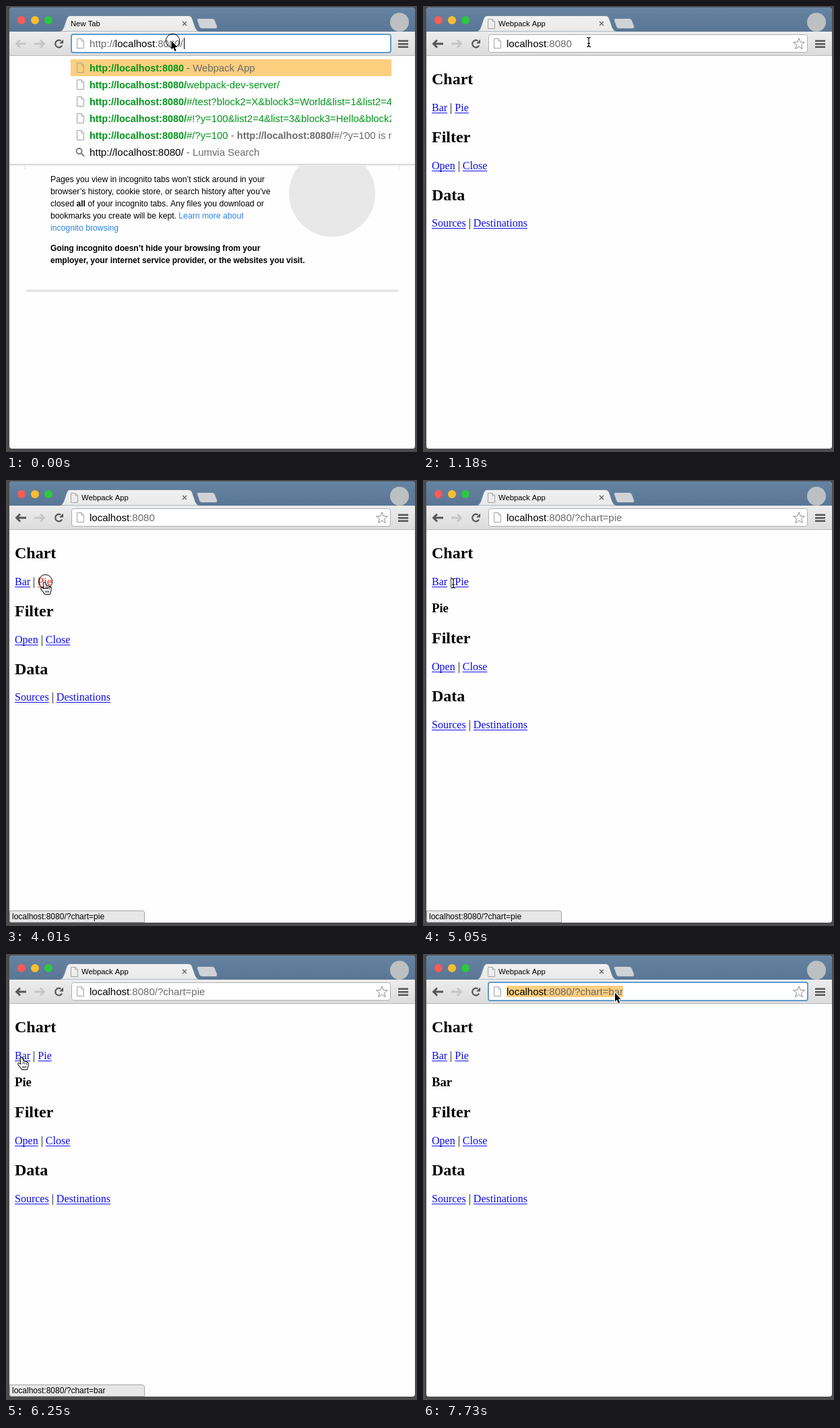
Recreate the animation shown at these times as an HTML page with a canvas. Size 610 px wide and 661 px high, loop 8 s.

```html
<!DOCTYPE html>
<html>
<head>
<meta charset="utf-8">
<style>
html, body { margin: 0; width: 100%; height: 100%; overflow: hidden; background: #4b4b4b; }
canvas { display: block; }
</style>
</head>
<body>
<canvas id="stage" width="610" height="661"></canvas>
<script>
const ctx = document.getElementById('stage').getContext('2d');
const LOOP = 8000;
const sans = (size, weight = '') => `${weight} ${size}px "Liberation Sans", Arial, sans-serif`;
const serif = (size, weight = '') => `${weight} ${size}px "Liberation Serif", Times, serif`;
const GREEN = '#00961a', GRAY = '#6a6a6a', BLUE = '#0b0be8', AMBER = '#fdcf7f';

// Pointer poses: start time, hot spot x, y, shape
const POINTER = [
  [0, 245, 51, 'arrow'], [1030, 246, 53.5, 'beam'],
  [2080, 232, 66, 'arrow'], [2230, 186, 97, 'arrow'], [2370, 129, 125, 'arrow'], [2520, 88.5, 141, 'arrow'],
  [2670, 72, 148, 'arrow'], [2820, 62, 151, 'hand'], [2960, 58, 152, 'hand'], [3110, 57, 152, 'hand'],
  [5050, 45, 153, 'beam'], [5200, 41, 157, 'beam'], [5350, 38, 162, 'arrow'], [5500, 36, 165, 'arrow'],
  [5650, 34, 166, 'arrow'], [5800, 31, 165, 'arrow'], [5950, 27, 161, 'arrow'], [6100, 23, 154, 'hand'],
  [6850, 42, 146, 'arrow'], [7000, 100, 121, 'arrow'], [7150, 185, 90, 'arrow'], [7290, 250, 67, 'arrow'],
  [7440, 284.5, 57, 'arrow']
];
const CLICKS = [[0, 150, 247.5, 51.5], [4010, 4300, 58.5, 150.5], [6400, 6550, 24.5, 152.5], [7590, 7730, 286, 58]];

const SHAPES = {
  arrow: new Path2D('M.5 .5V13.5L3.3 10.8L5.5 16L7.6 15.1L5.4 10H9.2Z'),
  hand: new Path2D('M-1.4 1.5C-1.4-.5 1.2-.5 1.5 1.2L2.4 6C3-.1 1 5 4.6 5.4L5 7C5.2 5 7 5.2 7.3 6.2L7.6 7.6C8.6 6.4 9.6 7 9.6 8.4V11.5L8 17H.8L-2 13C-4 10.6-5.6 9-4.6 8.2C-3.4 7.4-2 8.8-.5 10.2Z'),
  beam: new Path2D('M-3-7Q0-7 0-5Q0-7 3-7M0-5V5M-3 7Q0 7 0 5Q0 7 3 7M-2 2H2'),
  page: new Path2D('M.5.5H7L10.5 4V14.5H.5ZM7 .5V4H10.5'),
  back: new Path2D('M8 0H-6M-1-5.5L-6.5 0L-1 5.5')
};

function rect(x, y, w, h, fill) {
  ctx.fillStyle = fill;
  ctx.fillRect(x, y, w, h);
}
function box(x, y, w, h, r, fill, line, width = 1) {
  ctx.beginPath();
  ctx.roundRect(x, y, w, h, r);
  ctx.fillStyle = fill;
  ctx.fill();
  if (line) stroke(line, width);
}
function disc(x, y, r, fill) {
  ctx.beginPath();
  ctx.arc(x, y, r, 0, 7);
  ctx.fillStyle = fill;
  ctx.fill();
}
function stroke(color, width, path) {
  ctx.strokeStyle = color;
  ctx.lineWidth = width;
  path ? ctx.stroke(path) : ctx.stroke();
}
function star(x, y, inner, outer) {
  ctx.beginPath();
  for (let i = 0; i < 10; i++) {
    const r = i % 2 ? inner : outer, a = i * Math.PI / 5;
    ctx.lineTo(x + r * Math.sin(a), y - r * Math.cos(a));
  }
  ctx.closePath();
}
function at(x, y, draw) {
  ctx.save();
  ctx.translate(x, y);
  draw();
  ctx.restore();
}
function fade(y0, y1, top, bottom) {
  const g = ctx.createLinearGradient(0, y0, 0, y1);
  g.addColorStop(0, top);
  g.addColorStop(1, bottom);
  return g;
}
// Draws a run of text and returns the x where it ends
function text(x, y, str, font, color = '#000') {
  ctx.font = font;
  ctx.fillStyle = color;
  ctx.fillText(str, x, y);
  return x + ctx.measureText(str).width;
}
function link(x, y, str, color = BLUE) {
  const end = text(x, y, str, serif(16), color);
  rect(x, y + 2, end - x, 1, color);
  return end;
}
function poly(points, fill, line) {
  const path = new Path2D('M' + points + 'Z');
  ctx.fillStyle = fill;
  ctx.fill(path);
  stroke(line, 1, path);
}
const pageIcon = (x, y) => at(x, y, () => stroke('#a2a2a2', 1, SHAPES.page));

function frameAndTab(loaded) {
  rect(0, 0, 610, 661, '#4b4b4b');
  box(5, 2, 602, 654, [5, 5, 4, 4], '#fefefe');
  box(5, 2, 602, 36, [5, 5, 0, 0], fade(2, 38, '#6683a2', '#5a7695'));
  ['#fc5b57', '#fdbd30', '#2bc840'].forEach((c, i) => disc(23 + 20 * i, 21, 6, c));
  disc(584, 24, 14, '#bcc0c2');
  poly('80 38Q84 37 86 31L90 19Q91.500 14.500 95 14.500H271Q275 14.500 276.500 19L281 32Q283 37 287 38', fade(15, 38, '#f1f1f1', '#e9e9e9'), '#7389a0');
  poly('283.500 21Q283 18.500 286 18.500H306Q309 18.500 310 21L313.500 30Q314 33.500 311 33.500H291Q288 33.500 287 31', '#cfd3d8', '#71859a');
  if (loaded) pageIcon(96, 19);
  text(loaded ? 112 : 96, 30, loaded ? 'Webpack App' : 'New Tab', sans(11.25));
  at(265, 26, () => stroke('#666', 1.4, new Path2D('M-3-3L3 3M3-3L-3 3')));
}

function toolbar(s) {
  rect(5, 38, 602, 35, fade(38, 73, '#ededed', '#dcdcdc'));
  rect(5, 73, 602, 1, '#b9b9b9');
  at(22, 56, () => stroke(s.loaded ? '#555' : '#c6c6c6', 2.8, SHAPES.back));
  at(50, 56, () => {
    ctx.scale(-1, 1);
    stroke('#c6c6c6', 2.8, SHAPES.back);
  });
  ctx.beginPath();
  ctx.arc(78.5, 56, 5.3, 0.5, 5.3);
  stroke('#555', 2.2);
  ctx.fillStyle = '#555';
  ctx.fill(new Path2D('M85 49.500V55.500H79Z'));
  for (let i = 0; i < 3; i++) rect(582, 50.5 + 4.5 * i, 15, 2.5, '#555');

  if (s.focus) box(97, 42, 474, 27, 3, '#fff', '#5f9ccf', 2);
  else box(97.5, 42.5, 473, 26, 3, '#fff', '#b0b0b0');
  if (s.selected) rect(124, 47, 173, 17, AMBER);
  pageIcon(105, 48);
  const font = sans(15);
  let x = 124;
  if (!s.loaded) x = text(x, 61, 'http://', sans(15.15), GRAY);
  x = text(x, 61, 'localhost', font);
  text(x, 61, ':8080' + (s.loaded ? s.query : '/'), font, GRAY);
  if (s.caret) rect(264, 47, 1, 17, '#000');
  if (s.loaded) {
    star(558, 56.5, 3.7, 8.8);
    stroke('#8c8c8c', 1);
  }
}

function newTabPage() {
  rect(5, 74, 602, 39, '#f4f4f4');
  rect(5, 113, 602, 1, '#dedede');
  star(26.5, 94.5, 2.8, 6.8);
  ctx.fillStyle = '#777';
  ctx.fill();
  text(40, 98, 'Bookmarks', sans(12.2));
  rect(27, 184, 2, 58, '#eee');
  rect(583, 184, 2, 58, '#eee');
  box(29, 420, 554, 4, [0, 0, 4, 4], '#e6e6e6');
  disc(484, 278, 64, '#e8e8e8');
  text(66, 229, 'You’ve gone incognito', sans(21));

  const body = sans(12.2), bold = sans(12, 'bold'), blue = '#2a83ea';
  text(66, 261, 'Pages you view in incognito tabs won’t stick around in your', body);
  text(66, 279, 'browser’s history, cookie store, or search history after you’ve', body);
  let x = text(66, 297, 'closed ', body);
  x = text(x, 297, 'all', bold);
  text(x, 297, ' of your incognito tabs. Any files you download or', body);
  x = text(66, 315, 'bookmarks you create will be kept. ', body);
  text(x, 315, 'Learn more about', body, blue);
  text(66, 333, 'incognito browsing', body, blue);
  text(66, 363, 'Going incognito doesn’t hide your browsing from your', bold);
  text(66, 381, 'employer, your internet service provider, or the websites you visit.', bold);
}

function suggestions() {
  const host = 'http://localhost:8080', bold = sans(14.4, 'bold'), plain = sans(14.9);
  const rows = [
    [[host, bold, GREEN], [' - Webpack App', plain, GRAY]],
    [[host + '/', bold, GREEN], ['webpack-dev-server/', plain, GREEN]],
    [[host + '/', bold, GREEN], ['#/test?block2=X&block3=World&list=1&list2=4', plain, GREEN]],
    [[host + '/', bold, GREEN], ['#!?y=100&list2=4&list=3&block3=Hello&block2', plain, GREEN]],
    [[host + '/', bold, GREEN], ['#/?y=100', plain, GREEN], [' - ', plain, GRAY], [host + '/', bold, GRAY], ['#/?y=100 is not', plain, GRAY]],
    [[host + '/', sans(15.15), '#000'], [' - Lumvia Search', plain, GRAY]]
  ];
  rect(5, 74, 602, 160, '#fff');
  rect(5, 234, 602, 1, '#cacaca');
  rect(5, 235, 602, 2, '#ececec');
  rect(96, 79, 476, 25, AMBER);
  ctx.save();
  ctx.beginPath();
  ctx.rect(96, 74, 476, 160);
  ctx.clip();
  rows.forEach((runs, i) => {
    const y = 97 + 25 * i;
    if (i < 5) pageIcon(105, y - 13);
    let x = 124;
    for (const [str, font, color] of runs) x = text(x, y, str, font, color);
  });
  ctx.beginPath();
  ctx.arc(108.5, 215, 4, 0, 7);
  ctx.moveTo(111.5, 218);
  ctx.lineTo(116, 222.5);
  stroke('#777', 1.8);
  ctx.restore();
}

function appPage(s) {
  const dy = s.chart ? 40 : 0;
  const section = (y, title, a, b) => {
    const color = str => s.pressed === str ? '#e8200a' : BLUE;
    const linkY = y + 40 - (title === 'Data' && !s.chart ? 1 : 0);
    text(13, y, title, serif(24, 'bold'));
    let x = link(13, linkY, a, color(a));
    x = text(x, linkY, ' | ', serif(16));
    link(x, linkY, b, color(b));
  };
  section(116, 'Chart', 'Bar', 'Pie');
  if (s.chart) text(13, 196, s.chart, serif(18.72, 'bold'));
  section(202 + dy, 'Filter', 'Open', 'Close');
  section(288 + dy, 'Data', 'Sources', 'Destinations');
  if (s.status) {
    box(5.5, 638.5, 200, 17, [0, 3, 0, 3], '#e7e7e7', '#a5a5a5');
    text(9, 651, 'localhost:8080/?chart=' + s.status, sans(12));
  }
}

function pointer(t) {
  const [, x, y, kind] = POINTER.findLast(p => p[0] <= t);
  const shape = SHAPES[kind];
  at(x, y, () => {
    ctx.lineJoin = 'round';
    if (kind === 'beam') {
      stroke('#fff', 2.6, shape);
      stroke('#000', 1.2, shape);
    } else {
      const hand = kind === 'hand';
      stroke(hand ? '#000' : '#fff', 2, shape);
      ctx.fillStyle = hand ? '#fff' : '#000';
      ctx.fill(shape);
      if (hand) stroke('#000', 0.9, new Path2D('M2.3 6V9M4.900 7V9.500M7.500 8V10M2 12V15M4.200 12V15M6.400 12V15'));
    }
  });
  for (const [from, to, cx, cy] of CLICKS) {
    if (t < from || t >= to) continue;
    ctx.beginPath();
    ctx.arc(cx, cy, 10.2, 0, 7);
    stroke('#000', 1);
  }
}

function draw(t) {
  const within = (a, b) => t >= a && t < b;
  const chart = t < 4300 ? '' : t < 6550 ? 'Pie' : 'Bar';
  const s = {
    loaded: t >= 1180,
    chart,
    query: chart && '/?chart=' + chart.toLowerCase(),
    caret: t < 440 || within(890, 1180),
    focus: t < 1180 || t >= 7590,
    selected: t >= 7730,
    pressed: within(4010, 4300) ? 'Pie' : within(6400, 6550) ? 'Bar' : '',
    status: within(2820, 5350) ? 'pie' : within(6100, 7150) ? 'bar' : ''
  };
  frameAndTab(s.loaded);
  toolbar(s);
  if (s.loaded) appPage(s);
  else newTabPage();
  if (t < 890) suggestions();
  pointer(t);
}

function tick() {
  draw(performance.now() % LOOP);
  requestAnimationFrame(tick);
}
tick();
</script>
</body>
</html>
```
